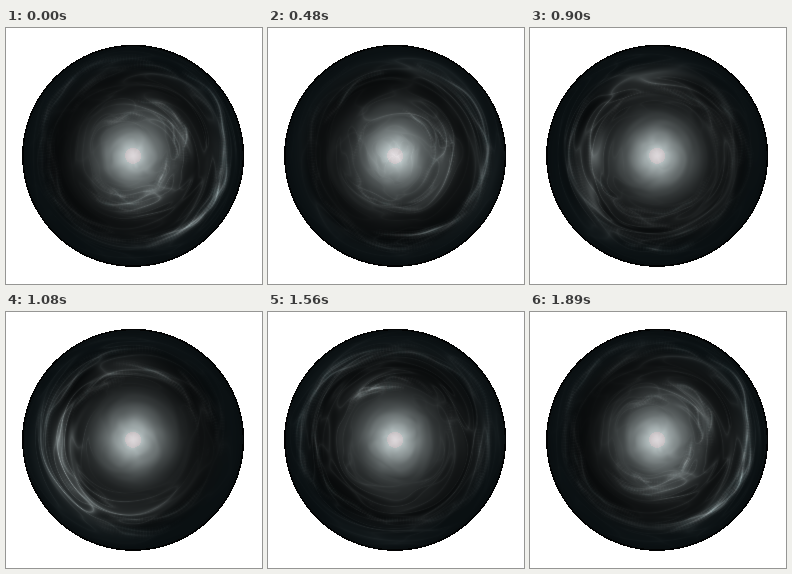
An HTML page with a canvas that plays this animation: 256 by 256 pixels, repeating every 1.92 s.

```html
<!DOCTYPE html>
<html>
<head>
<meta charset="utf-8">
<style>
html, body { margin: 0; width: 100%; height: 100%; overflow: hidden; background: #fff; }
canvas { display: block; width: 256px; height: 256px; }
</style>
</head>
<body>
<canvas id="c" width="256" height="256"></canvas>
<script>
const LOOP = 1920, STEP = 30, SIZE = 256, TAU = 2 * Math.PI;
const CX = 126.6, CY = 127.3, RADIUS = 111, STRANDS = 64;
const ctx = document.getElementById('c').getContext('2d');
const img = ctx.createImageData(SIZE, SIZE);

// Places where the gas flares up
const flares = [
  { time: 480, x: 127, y: 128, size: 26, power: 1.4 },
  { time: 720, x: 74, y: 138, size: 24, power: 1 },
  { time: 1200, x: 69, y: 122, size: 20, power: 3 },
  { time: 1800, x: 206, y: 130, size: 24, power: 1 }
];

let seed = 29;
const random = () => (seed = seed * 16807 % 2147483647) / 2147483647;
const perm = Uint8Array.from({ length: 256 }, (_, i) => i);
for (let i = 255; i > 0; i--) {
  const j = Math.floor(random() * (i + 1));
  [perm[i], perm[j]] = [perm[j], perm[i]];
}
const fade = x => x * x * x * (x * (x * 6 - 15) + 10);
const mix = (a, b, k) => a + (b - a) * k;
const wrap = (i, n) => ((i % n) + n) % n;
const bell = x => Math.exp(-x * x);
const wave = (t, peak) => Math.cos(TAU * (t - peak) / LOOP);
const since = (t, time) => wrap(t - time + LOOP / 2, LOOP) - LOOP / 2;

function grad(h, x, y, z) {
  h &= 15;
  const u = h < 8 ? x : y;
  const v = h < 4 ? y : h === 12 || h === 14 ? x : z;
  return (h & 1 ? -u : u) + (h & 2 ? -v : v);
}

// Gradient noise that repeats after pu cells in u and pw cells in w
function noise(u, v, w, pu, pw) {
  const i = Math.floor(u), j = Math.floor(v), k = Math.floor(w);
  const x = u - i, y = v - j, z = w - k, fx = fade(x), fy = fade(y);
  const i0 = wrap(i, pu), i1 = wrap(i + 1, pu);
  const layer = dz => {
    const p = perm[wrap(k + dz, pw)], q = perm[(p + j) & 255], s = perm[(p + j + 1) & 255];
    const top = mix(grad(perm[(q + i0) & 255], x, y, z - dz),
                    grad(perm[(q + i1) & 255], x - 1, y, z - dz), fx);
    const low = mix(grad(perm[(s + i0) & 255], x, y - 1, z - dz),
                    grad(perm[(s + i1) & 255], x - 1, y - 1, z - dz), fx);
    return mix(top, low, fy);
  };
  return mix(layer(0), layer(1), fade(z));
}

// The inner shell breathes; the outer one stays near the rim
const innerShell = t => 59 + 15 * wave(t, 1180);
// The brighter side swings from right to left and back
const sideLight = (t, cos) => .6 - .55 * cos * wave(t, 1150);

const pixels = [];
for (let y = 0; y < SIZE; y++) for (let x = 0; x < SIZE; x++) {
  const dx = x - CX, dy = y - CY, r = Math.hypot(dx, dy);
  if (r < RADIUS) pixels.push({
    at: (y * SIZE + x) * 4, x, y, r, cos: dx / (r + 12),
    turn: Math.atan2(dy, dx) / TAU + .5,
    core: 208 * Math.exp(-Math.pow(r / 33, 1.5)),
    heart: r < 8 ? 10 : 0,
    haze: r > 109.5 ? 1 : 4 + 11 * bell((r - 102) / 16)
  });
}

const strands = Array.from({ length: STRANDS }, (_, i) => ({
  time: random() * LOOP,
  life: 150 + 130 * random(),
  outer: i % 2,
  shift: 22 * (random() - .5),
  mid: TAU * random(),
  half: .35 + .65 * random(),
  lean: 14 * (random() - .5),
  power: .3 + .7 * random()
}));

function drawCloud(t) {
  const w = t / LOOP * 6, inner = innerShell(t);
  const lit = flares.map(f => ({ ...f, now: f.power * bell(since(t, f.time) / 230) }))
                    .filter(f => f.now > .02);
  for (const { at, x, y, r, cos, turn, core, heart, haze } of pixels) {
    const bend = noise(turn * 5, r / 30, w, 5, 6);
    const a = noise(turn * 5 + bend * .6, r / 13 + bend, w + 20, 5, 6);
    const b = noise(turn * 9 + bend, r / 8 + a, w, 9, 6);
    const ridge = Math.exp(-Math.abs(a) * 12) * (.6 + bend) +
                  Math.exp(-Math.abs(b) * 10) * .4;
    const veil = Math.max(0, .2 + bend * .5 + b * .25);
    const shell = 46 * bell((r - inner) / 15) + 26 * bell((r - 88) / 15);
    const flare = lit.reduce((sum, f) =>
      sum + f.now * bell(Math.hypot(x - f.x, y - f.y) / f.size), 0);
    const gas = (shell * sideLight(t, cos) * 1.3 + flare * 26) *
                (Math.max(0, ridge) + veil) * (1 - core / 260);
    const c = core * (1 + b * .12 * Math.min(1, r / 30)) + gas;
    img.data[at] = c * .95 + haze * .6 + heart * 2;
    img.data[at + 1] = c + haze + heart * .3;
    img.data[at + 2] = c + haze * 1.15 + heart * .5;
    img.data[at + 3] = 255;
  }
  ctx.putImageData(img, 0, 0);
}

function drawStrands(t) {
  const w = t / LOOP * 6, inner = innerShell(t);
  ctx.globalCompositeOperation = 'lighter';
  strands.forEach((s, n) => {
    const power = s.power * bell(since(t, s.time) / s.life);
    if (power < .03) return;
    const base = s.outer ? 88 + s.shift * .8 : inner + s.shift;
    const count = Math.ceil(s.half * base / 1.5);
    const point = k => {
      const turn = (2 * k - 1) * s.half, a = s.mid + turn;
      const r = base + s.lean * Math.sin(turn * 1.5) + 7 * noise(turn * 2.2, n * 3.7, w, 256, 6);
      return [CX + r * Math.cos(a), CY + r * Math.sin(a)];
    };
    for (let i = 0; i < count; i++) {
      const k = (i + .5) / count, cos = Math.cos(s.mid + (2 * k - 1) * s.half);
      const glow = power * Math.sin(Math.PI * k) * sideLight(t, cos) *
                   (.7 + noise(k * 5, n * 2.3, w, 256, 6));
      for (const [width, alpha] of [[8, .05], [4, .09], [1.5, .25]]) {
        ctx.strokeStyle = `rgba(208,222,222,${Math.max(0, glow * alpha)})`;
        ctx.lineWidth = width;
        ctx.beginPath();
        ctx.moveTo(...point(i / count));
        ctx.lineTo(...point((i + 1) / count));
        ctx.stroke();
      }
    }
  });
  ctx.globalCompositeOperation = 'source-over';
}

let shown = -1;
function frame() {
  const t = Math.floor(performance.now() % LOOP / STEP) * STEP;
  if (t !== shown) {
    shown = t;
    drawCloud(t);
    ctx.save();
    ctx.beginPath();
    ctx.arc(CX + .5, CY + .5, RADIUS - 2, 0, TAU);
    ctx.clip();
    drawStrands(t);
    ctx.restore();
  }
  requestAnimationFrame(frame);
}
frame();
</script>
</body>
</html>
```
